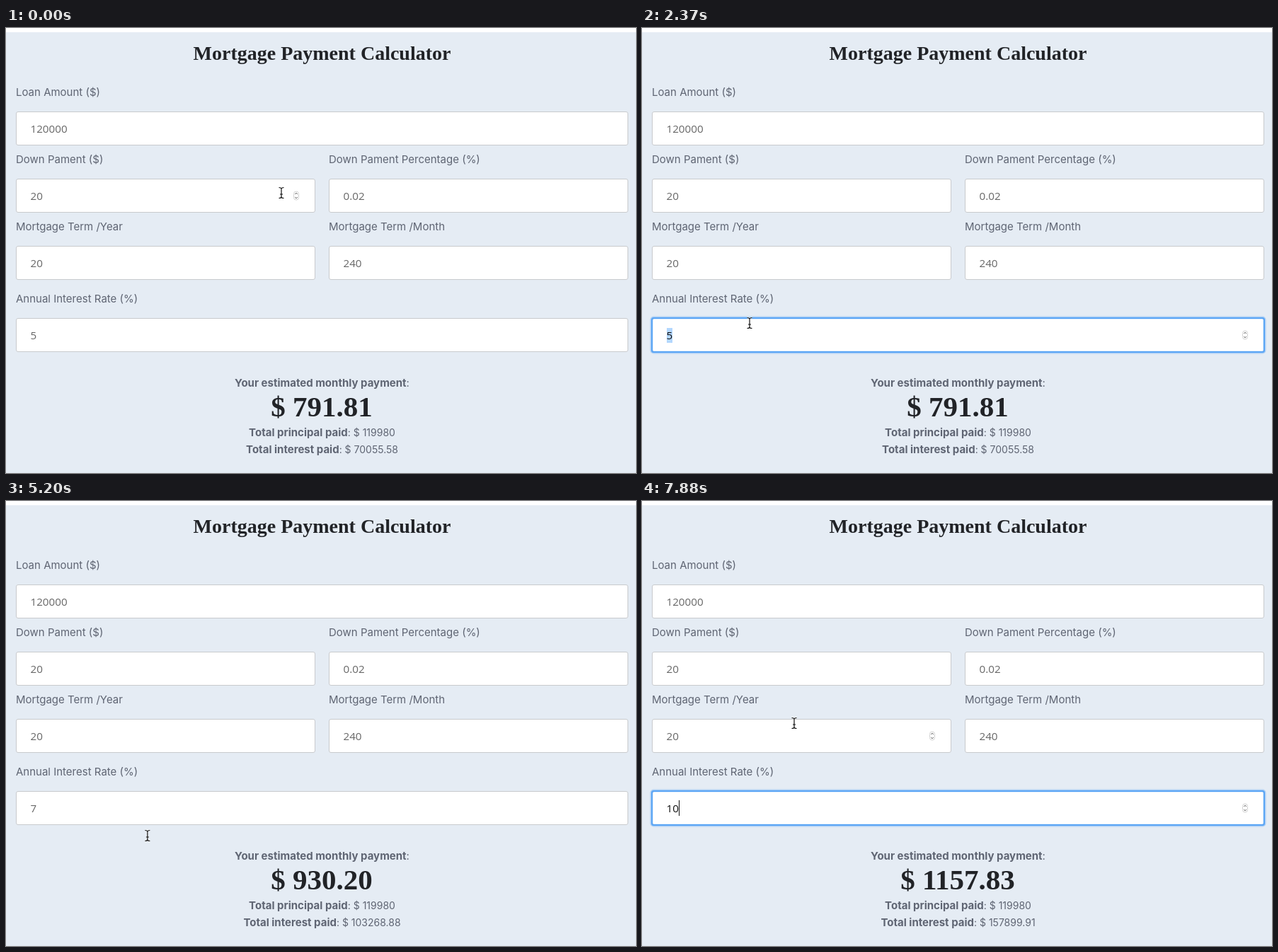
Write an HTML page that moves like this. It is 890x629 px and loops after 8 s.

```html
<!DOCTYPE html>
<html lang="en">
<head>
<meta charset="utf-8">
<title>Mortgage Payment Calculator</title>
<style>
  html, body { margin: 0; width: 100%; height: 100%; overflow: hidden; background: #fff; }
  svg { display: block; }
  text { font: 15px Inter, sans-serif; fill: #5f6573; }
  .center { text-anchor: middle; }
  .strong { font-weight: 700; }
  .figure { font-size: 14px; }
  .value { font: 15.2px "Open Sans", "Noto Sans", sans-serif; fill: #666; }
  .title, .amount { font: bold 28px "Liberation Serif", serif; fill: #212327; }
  .amount { font-size: 41px; }
  .box { fill: #fff; stroke: #c8cacd; }
  .focused .value { fill: #111; }
  .spinner rect { fill: #fff; stroke: #d2d2d2; }
  .spinner path { fill: none; stroke: #555; }
</style>
</head>
<body>
<svg width="890" height="629" viewBox="0 0 890 629">
  <defs>
    <path id="beam" d="M-3.5-7.5Q0-7.5 0-5.5V5.5Q0 7.5-3.5 7.5M3.5-7.5Q0-7.5 0-5.5M3.5 7.5Q0 7.5 0 5.5M-2 2H2"/>
  </defs>
  <rect y="6" width="890" height="623" fill="#e5ecf4"/>
  <text class="title center" x="446.5" y="45">Mortgage Payment Calculator</text>
  <g id="form"></g>
  <g class="center">
    <text x="446.5" y="507"><tspan class="strong">Your estimated monthly payment</tspan>:</text>
    <text class="amount" x="446" y="549" id="payment"></text>
    <text x="446.5" y="577"><tspan class="strong">Total principal paid</tspan><tspan class="figure">: $ 119980</tspan></text>
    <text x="446.5" y="601"><tspan class="strong">Total interest paid</tspan><tspan class="figure" id="interest"></tspan></text>
  </g>
  <g id="cursor" fill="none">
    <use href="#beam" stroke="#fff" stroke-width="2.6" stroke-opacity=".7"/>
    <use href="#beam" stroke="#111" stroke-width="1.2"/>
  </g>
</svg>
<script>
const $ = id => document.getElementById(id);

// label, value, left, top, width
const fields = [
  ['Loan Amount ($)', '120000', 14, 118, 864],
  ['Down Pament ($)', '20', 14, 213, 422],
  ['Down Pament Percentage (%)', '0.02', 456, 213, 422],
  ['Mortgage Term /Year', '20', 14, 308, 422],
  ['Mortgage Term /Month', '240', 456, 308, 422],
  ['Annual Interest Rate (%)', '5', 14, 410, 864]
].map(([label, value, x, y, w]) => ({ label, value, x, y, w }));

$('form').innerHTML = fields.map(({ label, value, x, y, w }, i) => `
  <g id="field${i}">
    <text x="${x}" y="${y - 22}">${label}</text>
    <rect class="box" x="${x + .5}" y="${y + .5}" width="${w}" height="47" rx="2.5"/>
    ${i === 5 ? `<g id="ring" fill="none" stroke="#5aa5f5">
      <rect x="13.5" y="409.5" width="866" height="49" rx="3" stroke-width="4" stroke-opacity=".4"/>
      <rect x="14" y="410" width="865" height="48" rx="2.5" stroke-width="2"/></g>
    <rect id="selection" x="35" y="424" width="8" height="21" fill="#b3d7fe"/>` : ''}
    <text class="value" x="${x + 20.5}" y="${y + 30}">${value}</text>
    <g class="spinner" transform="translate(${x + w - 26} ${y + 24})">
      <rect x="-3.5" y="-6" width="7" height="12" rx="3.5"/>
      <path d="M-1.8-2L0-3.8L1.8-2M-1.8 2L0 3.8L1.8 2"/>
    </g>
  </g>`).join('') + '<rect id="caret" y="423" width="1" height="22" fill="#111"/>';

const rateText = $('field5').querySelector('.value');

// Pointer moves: start, end, number of steps, target x, target y
const moves = [
  [290, 880, 5, 257, 150],
  [1180, 1180, 1, 212.5, 265],
  [1330, 1620, 3, 167, 384],
  [1920, 2370, 4, 152, 417],
  [3720, 4460, 6, 369, 542],
  [4600, 4750, 2, 372, 554],
  [5050, 5500, 4, 142.5, 446],
  [7130, 7880, 6, 215, 314]
];

// Time, rate typed, focused, caret shown
const states = [
  [0, '5', 0, 0], [2220, '5', 1, 0], [3270, '7', 1, 1], [3720, '7', 1, 0],
  [4160, '7', 0, 0], [5500, '7', 1, 1], [5950, '7', 1, 0], [6250, '', 1, 1],
  [6400, '1', 1, 1], [6540, '10', 1, 1], [7130, '10', 1, 0], [7580, '10', 1, 1]
];

function pointerAt(t) {
  let x = 389, y = 233;
  for (const [start, end, steps, toX, toY] of moves) {
    if (t < start) break;
    const gap = (end - start) / (steps - 1) || 1;
    const u = Math.min(steps, Math.floor((t - start) / gap + 1.001)) / steps;
    const eased = 1 - (1 - u) ** 2;
    x += (toX - x) * eased;
    y += (toY - y) * eased;
  }
  return [x, y];
}

const show = (el, on) => { el.style.display = on ? '' : 'none'; };

function showResults(rate) {
  const principal = 119980, months = 240, r = rate / 1200;
  const payment = principal * r / (1 - (1 + r) ** -months);
  $('payment').textContent = '$ ' + payment.toFixed(2);
  $('interest').textContent = ': $ ' + (payment * months - principal).toFixed(2);
}

function render(t) {
  const [x, y] = pointerAt(t);
  const past = states.filter(s => s[0] <= t);
  const [, rate, focused, caret] = past[past.length - 1];
  $('cursor').setAttribute('transform', `translate(${x} ${y})`);
  fields.forEach((f, i) => {
    const hovered = x >= f.x && x <= f.x + f.w && y >= f.y && y <= f.y + 48;
    show($('field' + i).querySelector('.spinner'), hovered || (i === 5 && focused));
  });
  rateText.textContent = rate;
  $('field5').classList.toggle('focused', !!focused);
  show($('ring'), focused);
  show($('selection'), focused && rate === '5');
  show($('caret'), caret);
  $('caret').setAttribute('x', [35, 43, 52][rate.length]);
  showResults(rate || 7);
}

function tick() {
  render(performance.now() % 8000);
  requestAnimationFrame(tick);
}
tick();
</script>
</body>
</html>
```
